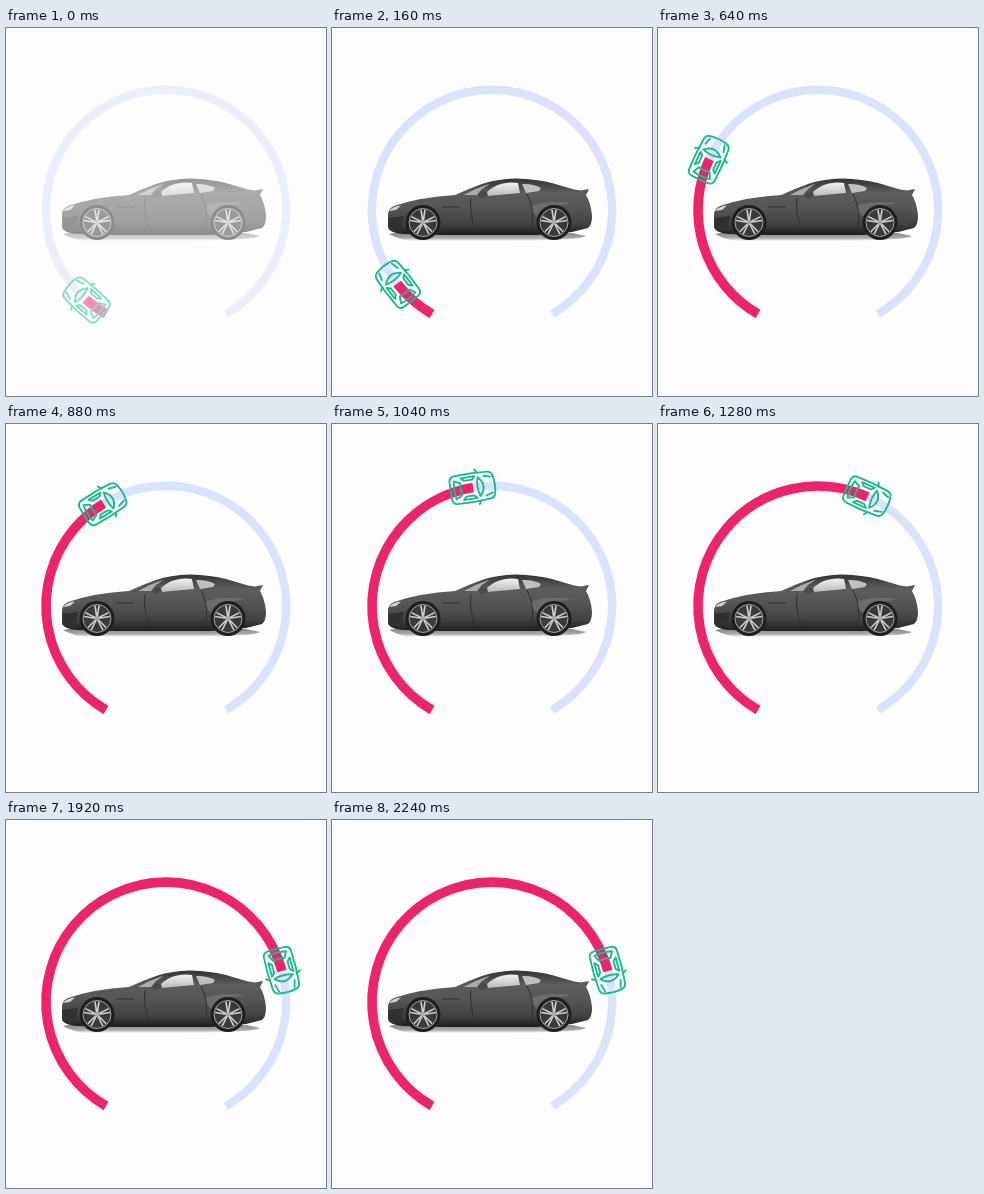
An HTML page for the animation above (2320 ms loop, 320 by 368 pixels).

```html
<!DOCTYPE html>
<html lang="en">
<head>
<meta charset="utf-8">
<title>Car gauge</title>
<style>
  html, body { margin: 0; width: 100%; height: 100%; overflow: hidden; background: #fdfdfd; }
  svg { display: block; width: 320px; height: 368px; }
  .ring { fill: none; }
</style>
</head>
<body>
<svg viewBox="0 0 320 368">
  <defs>
    <linearGradient id="paint" x1="0" y1="0" x2="0" y2="1">
      <stop offset="0" stop-color="#333234"/>
      <stop offset=".25" stop-color="#5c5b5d"/>
      <stop offset=".5" stop-color="#565557"/>
      <stop offset=".8" stop-color="#424143"/>
      <stop offset="1" stop-color="#1d1c1e"/>
    </linearGradient>
    <linearGradient id="shade" x1="0" y1="0" x2="0" y2="1">
      <stop offset="0" stop-color="#888"/>
      <stop offset=".6" stop-color="#a8a8a8"/>
      <stop offset="1" stop-color="#fdfdfd"/>
    </linearGradient>
    <linearGradient id="glass" x1="0" y1="0" x2="0" y2="1">
      <stop offset="0" stop-color="#f1f1f1"/>
      <stop offset="1" stop-color="#b9babb"/>
    </linearGradient>
    <g id="wheel">
      <circle r="17.5" fill="#1f1e20"/>
      <circle r="14" fill="#3a393b" stroke="#a5a4a4"/>
      <g id="spokes" stroke="#cfcece" stroke-width="1.6"></g>
      <circle r="2.4" fill="#aaa"/>
    </g>
  </defs>
  <g id="scene">
    <!-- side view -->
    <path d="M62 205H240L254 208Q246 213 160 213L76 213Q64 210 57 206Z" fill="url(#shade)"/>
    <path d="M56 189Q55 181 62 178Q88 169 123 167Q136 161 150 156Q164 151 184 150.500Q205 151 220 155L242 161.500L249 162.500L257 161L254 167Q259 175 260 188Q260 197 256 200L240 204L205 207H110L72 206Q57 205 56 199Z" fill="url(#paint)"/>
    <path d="M199 178Q212 172 240 175Q216 178 207 190Q200 186 199 178Z" fill="#777678" opacity=".7"/>
    <path d="M132 167Q144 160 158 155.500L150 161L145 167Z" fill="#a9acad"/>
    <path d="M153 166Q160 158 171 155.500Q179 154 186 155L188 165L155 168Z" fill="url(#glass)"/>
    <path d="M190 156Q201 155.500 209 160L207 163L194 165Z" fill="#bfc0c1"/>
    <path d="M146 167l3-4 6 1 1 4-7 2Z" fill="#4a494b"/>
    <path d="M57 183Q61 178 69 177.500L64 182Z" fill="#d2d2d2"/>
    <path d="M56 190L72 188L70 199L57 200Z" fill="#302f31"/>
    <path d="M110 179H128M139 170Q137 184 143 201M195 166Q204 184 199 201" fill="none" stroke="#302f31"/>
    <use href="#wheel" transform="translate(91 194.500)"/>
    <use href="#wheel" transform="translate(222 194.500)"/>

    <path class="ring" stroke="#dbe3fc" stroke-width="8.4" d="M100 286.100A120.200 120.200 0 1 1 220 286.100"/>
    <path class="ring" id="progress" stroke="#ec246b" stroke-width="9.6" pathLength="300" d="M100 286A120 120 0 1 1 220 286"/>

    <!-- top view, heading along +x -->
    <g id="marker" fill="none" stroke="#1bb892" stroke-width="1.9" stroke-linejoin="round" stroke-linecap="round">
      <path d="M-18-14Q0-15 16-13.500Q20-13 21-9Q23 0 21 9Q20 13 16 13.500Q0 15-18 14Q-22 13.500-22.500 9Q-23 0-22.500-9Q-22-13.500-18-14Z"/>
      <path d="M6-9.500Q15 0 6 9.500Q3 0 6-9.500Z"/>
      <path d="M-18-9Q-20 0-18 9L-12 6Q-13 0-12-6Z"/>
      <path d="M-11-11H3L0-8H-8ZM-11 11H3L0 8H-8Z"/>
      <path d="M6-14L4-17.500M6 14L4 17.500M12-10L19-8M12 10L19 8"/>
    </g>
  </g>
</svg>
<script>
  const LOOP = 2320, STEP = 80, SPEED = 0.1395, END = 225;
  const $ = id => document.getElementById(id);

  for (let i = 0; i < 5; i++) {
    for (const spread of [-9, 9]) {
      const a = (i * 72 - 90 + spread) * Math.PI / 180;
      const line = document.createElementNS('http://www.w3.org/2000/svg', 'line');
      line.setAttribute('x2', 13 * Math.cos(a));
      line.setAttribute('y2', 13 * Math.sin(a));
      $('spokes').append(line);
    }
  }

  // Degrees travelled: soft start, then a steady run up to the end.
  function travel(t) {
    const softStart = 0.000157 * Math.max(0, 320 - t) ** 2;
    return Math.min(END, 40.5 + SPEED * (t - 320) + softStart);
  }

  function draw() {
    const t = Math.floor((performance.now() + 2) % LOOP / STEP) * STEP;
    const angle = travel(t);
    $('scene').setAttribute('opacity', Math.min(1, 0.5 + t / 320));
    $('progress').setAttribute('stroke-dasharray', `${angle} 400`);
    $('marker').setAttribute('transform',
      `translate(160 182) rotate(${angle + 120}) translate(120 0) rotate(90)`);
    requestAnimationFrame(draw);
  }
  draw();
</script>
</body>
</html>
```
